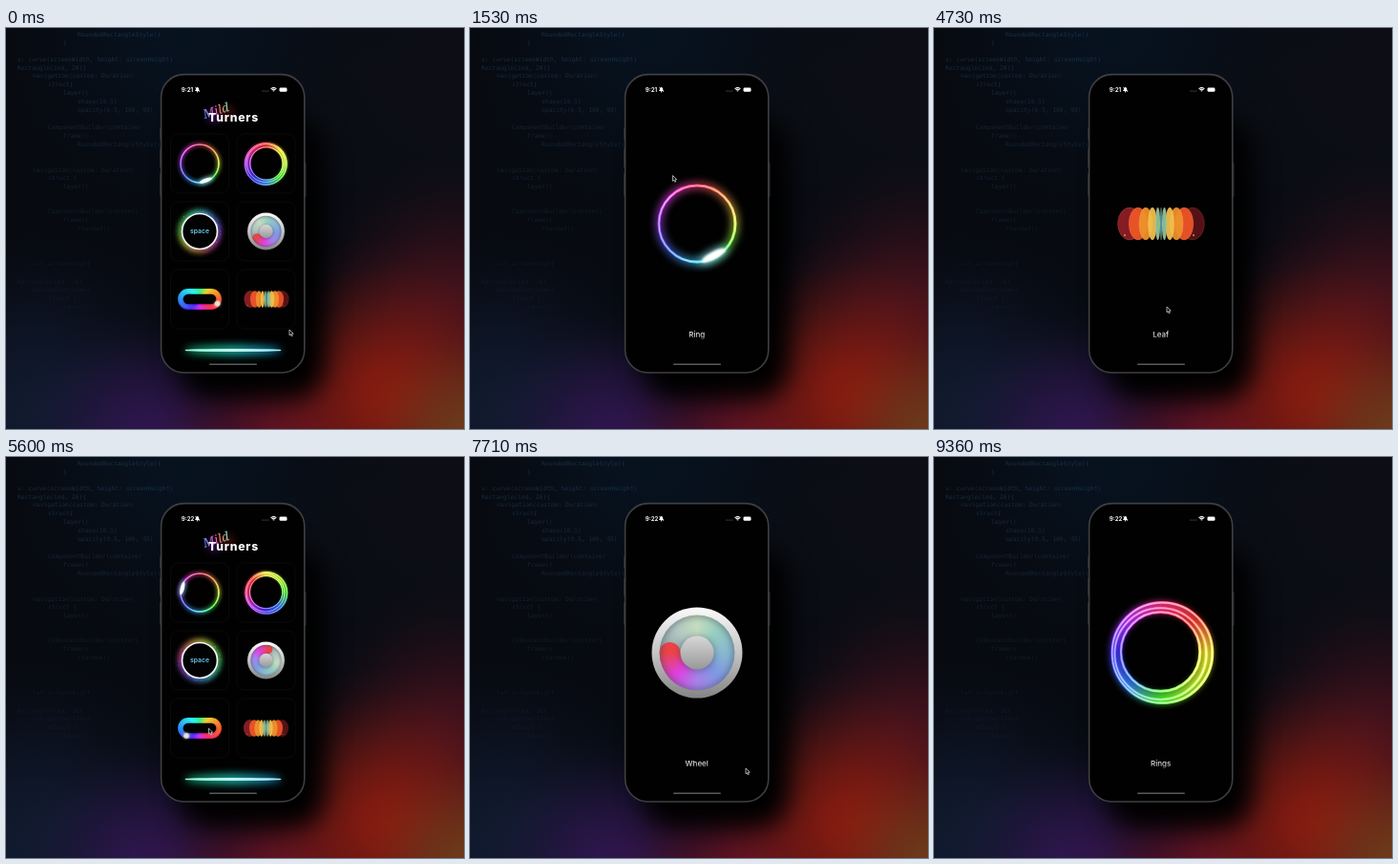
An HTML page with a canvas that plays this animation: 480 by 420 pixels, repeating every 9380 ms.

```html
<!DOCTYPE html>
<html lang="en">
<head>
<meta charset="utf-8">
<title>Loader gallery</title>
<style>
html, body { margin: 0; width: 100%; height: 100%; overflow: hidden; background: #05070c; }
canvas { display: block; width: 480px; height: 420px; }
</style>
</head>
<body>
<canvas id="stage" width="480" height="420"></canvas>
<script>
const W = 480, H = 420, LOOP = 9380, TAU = Math.PI * 2;
const SANS = 'Inter, "Liberation Sans", sans-serif';
const SCREEN = { x: 167.5, y: 52, w: 140.5, h: 306, r: 20 };
const SLIDE = 145;
let ctx = document.getElementById('stage').getContext('2d');
const stage = ctx;

const rad = d => d * Math.PI / 180;
const clamp = v => Math.max(0, Math.min(1, v));
const smooth = v => { v = clamp(v); return v * v * (3 - 2 * v); };
const hsl = (h, s, l, a = 1) => `hsla(${h},${s}%,${l}%,${a})`;

function rng(seed) {
  return () => (seed = (seed * 16807) % 2147483647) / 2147483647;
}
function group(fn) { ctx.save(); fn(); ctx.restore(); }
function ramp(g, stops) {
  stops.forEach((c, i) => g.addColorStop(i / (stops.length - 1), c));
  return g;
}
const vert = (a, b, ...stops) => ramp(ctx.createLinearGradient(0, a, 0, b), stops);
// hues are spread clockwise over the full turn
function sweep(start, hues, s = 95, l = 60) {
  return ramp(ctx.createConicGradient(start, 0, 0), [...hues, hues[0]].map(h => hsl(h, s, l)));
}
function box(x, y, w, h, r) { ctx.beginPath(); ctx.roundRect(x, y, w, h, r); }
function disc(x, y, r, fill) {
  ctx.beginPath(); ctx.arc(x, y, r, 0, TAU);
  ctx.fillStyle = fill; ctx.fill();
}
function circle(x, y, r, stroke, width) {
  ctx.beginPath(); ctx.arc(x, y, r, 0, TAU);
  ctx.strokeStyle = stroke; ctx.lineWidth = width; ctx.stroke();
}
function text(s, x, y, font, fill, align = 'left') {
  ctx.font = font; ctx.fillStyle = fill; ctx.textAlign = align;
  ctx.fillText(s, x, y);
}
const blur = px => { ctx.filter = `blur(${px}px)`; };

// ---- loaders, drawn around 0,0 at full size; k is the scale in use ----

const RING_HUES = [68, 120, 190, 225, 270, 300, 345, 25];
function ring(t, k, big) {
  const hues = sweep(0, RING_HUES, 90, 62);
  const a = rad(big ? 62 + 215 * (t - 1.53) : 70 + 215 * t);
  group(() => { blur(4 * k); ctx.globalAlpha = .8; circle(0, 0, 40, hues, 6); });
  circle(0, 0, 40, hues, 3);
  circle(0, 0, 40, sweep(0, RING_HUES, 100, 84), 1.2);
  ctx.rotate(a);
  const glint = (rx, ry, fill, b) => group(() => {
    blur(b * k);
    ctx.beginPath(); ctx.ellipse(37.5, 0, ry, rx, 0, 0, TAU);
    ctx.fillStyle = fill; ctx.fill();
  });
  glint(17, 6, 'rgba(150,225,255,.7)', 4);
  glint(14, 4, '#fff', 1);
}

const RINGS_HUES = [58, 76, 112, 215, 245, 282, 335, 362];
function rings(t, k) {
  const a = rad(120 * (t - 9.36));
  const hues = sweep(a, RINGS_HUES, 90, 58), pale = sweep(a, RINGS_HUES, 100, 83);
  group(() => { blur(3.5 * k); ctx.globalAlpha = .8; circle(0, 0, 48, hues, 11); });
  group(() => { ctx.globalAlpha = .45; circle(0, 0, 47, hues, 11); });
  [52.5, 48, 41.5].forEach((r, i) => {
    const b = a * 1.5 + i * TAU / 3, x = 1.2 * Math.cos(b), y = 1.2 * Math.sin(b);
    circle(x, y, r, hues, 3.2);
    circle(x, y, r, pale, 1.8);
  });
}

const rand = rng(41);
const dust = Array.from({ length: 70 }, () => [rand() * TAU, rand(), rand()]);
function space(t, k) {
  const hue = 195 + 64.5 * t;
  const hues = sweep(rad(90 * t), RING_HUES.map(h => h + hue), 80, 62);
  group(() => { blur(8 * k); circle(0, 0, 44, hues, 13); });
  dust.forEach(([a, d, s]) => {
    const out = (d + t * .5) % 1, r = 45 + 15 * out;
    disc(r * Math.cos(a + t * .3), r * Math.sin(a + t * .3), .5 + .7 * s,
      hsl(hue + a * 57, 80, 75, .8 * (1 - out)));
  });
  disc(0, 0, 43, '#020203');
  group(() => { blur(.5 * k); circle(0, 0, 43, '#f4f4fa', 4); });
  text('space', 0, 5.5, `600 16px ${SANS}`, hsl(hue, 80, 68), 'center');
}

function wheel(t, k, big) {
  const a = rad(big ? 180 + 153 * (t - 7.71) : 145 + 153 * t);
  disc(0, 0, 47.5, vert(-47, 47, '#fafafa', '#c4c4c4', '#858585'));
  group(() => {
    ctx.beginPath(); ctx.arc(0, 0, 39.5, 0, TAU); ctx.clip();
    disc(0, 0, 40, ramp(ctx.createConicGradient(a, 0, 0), ['#8fa0a4', '#b2c6c2',
      '#c4dcbf', '#95ccc0', '#88b8cf', '#7f99e2', '#a583e8', '#e040df', '#ea4446']));
    // round nose in front of the sweep
    ctx.beginPath();
    ctx.arc(28.5 * Math.cos(a), 28.5 * Math.sin(a), 11, a - .03, a + Math.PI + .03);
    ctx.fillStyle = '#ea4446'; ctx.fill();
    group(() => { blur(3 * k); circle(0, 0, 40, 'rgba(60,70,85,.55)', 5); });
    group(() => { blur(3 * k); disc(0, 1, 19, 'rgba(50,50,70,.35)'); });
  });
  disc(0, 0, 17.5, vert(-17, 17, '#d6d6d6', '#999'));
}

const LANE = { half: 23.5, r: 16 };
const LANE_HUES = [15, 342, 290, 250, 210, 180, 150, 50];
function onLane(s) {
  const { half, r } = LANE, side = half * 2, bend = Math.PI * r, lap = 2 * (side + bend);
  s = ((s % lap) + lap) % lap;
  const flip = s >= lap / 2 ? -1 : 1;
  s %= lap / 2;
  let x = s - half, y = -r;
  if (s > side) {
    const a = (s - side) / r - Math.PI / 2;
    x = half + r * Math.cos(a); y = r * Math.sin(a);
  }
  return [x * flip, y * flip];
}
function track(t, k, big) {
  const lane = (w, c) => {
    box(-39.5, -16, 79, 32, 16);
    ctx.strokeStyle = c; ctx.lineWidth = w; ctx.stroke();
  };
  const s = big ? 66 : 88;
  lane(11, sweep(0, LANE_HUES, s, big ? 44 : 52));
  group(() => { blur(2 * k); lane(4, sweep(0, LANE_HUES, s, big ? 54 : 62)); });
  const [x, y] = onLane(big ? 42.5 + 116 * (t - 6.69) : 82 + 116 * t);
  group(() => { blur(2 * k); disc(x, y, 7, 'rgba(255,220,160,.5)'); });
  disc(x, y, 5.4, '#e9e4de');
  circle(x, y, 4.2, 'rgba(190,170,160,.6)', .8);
}

const LEAVES = ['#3d9db0', '#8fc4a0', '#f2c04c', '#f0912c', '#ee5528', '#8e1d26'];
function leaf(t) {
  const flow = .11 * Math.sin((t - 4.73) * 3.6);
  for (let j = 5; j >= 0; j--) {
    for (const side of j ? [-1, 1] : [1]) {
      const u = side * j / 5 + flow * (1 - j / 6), m = Math.abs(u);
      const x = Math.sign(u) * 33 * m ** 1.4, w = 2 + 23 * m ** 1.25;
      ctx.beginPath(); ctx.ellipse(x, 0, w / 2, 17, 0, 0, TAU);
      ctx.globalAlpha = j == 5 && side > 0 ? .6 : .94;
      ctx.fillStyle = LEAVES[j]; ctx.fill();
      ctx.strokeStyle = 'rgba(255,190,90,.35)'; ctx.lineWidth = .5; ctx.stroke();
    }
  }
  ctx.globalAlpha = .7;
  for (const x of [-38, 34]) disc(x, 12, .9, '#ffd9a0');
}

// ---- fixed scenery ----

const CODE = [
  [8, 75, 'RoundedRectangleStyle()'], [17, 60, '}'],
  [34, 12, 'x: curve(screenWidth, height: screenHeight)'],
  [43, 12, 'Rectangle(ind, 20){'], [51, 28, 'navigation(custom: Duration('],
  [60, 44, 'struct{'], [69, 60, 'layer()'], [78, 75, 'shape(10.5)'],
  [87, 75, 'opacity(0.5, 100, 95)'], [105, 44, 'ComponentBuilder(container'],
  [114, 60, 'frame()'], [123, 75, 'RoundedRectangleStyle()'],
  [150, 28, 'navigation(custom: Duration('], [158, 44, 'struct {'], [167, 60, 'layer()'],
  [193, 44, 'ComponentBuilder(content)'], [202, 60, 'frame()'], [211, 75, 'rounded()'],
  [248, 28, 'let screenHeight'], [267, 12, 'Rectangle(ind, 20)'],
  [275, 28, 'navigation(view)'], [284, 44, 'struct {'], [293, 60, 'layer()']
];

function glow(x, y, r, color) {
  const g = ctx.createRadialGradient(x, y, 0, x, y, r);
  for (let i = 0; i <= 6; i++) g.addColorStop(i / 6, `rgba(${color},${(1 - smooth(i / 6)) * .95})`);
  ctx.fillStyle = g; ctx.fillRect(0, 0, W, H);
}

function scenery() {
  const layer = document.createElement('canvas');
  layer.width = W; layer.height = H;
  ctx = layer.getContext('2d');
  ctx.fillStyle = '#070a11'; ctx.fillRect(0, 0, W, H);
  glow(450, 60, 260, '14,15,22');
  glow(190, 0, 200, '7,19,32');
  glow(30, 400, 190, '17,27,48');
  glow(150, 430, 140, '48,22,80');
  glow(285, 445, 140, '98,18,40');
  glow(470, 300, 170, '66,18,30');
  glow(400, 385, 165, '140,28,16');
  glow(490, 430, 125, '112,62,28');
  CODE.forEach(([y, x, s]) => text(s, x, y + 1, '6.3px "DejaVu Sans Mono", monospace',
    `rgba(50,90,125,${.44 - y / 1000})`));
  group(() => {
    blur(13); ctx.fillStyle = '#000';
    box(180, 96, 154, 292, 34); ctx.fill();
  });
  ctx.fillStyle = '#2c2c2e';
  [[161, 104, 13], [161, 126, 20], [161, 152, 24], [312.5, 141, 36]].forEach(([x, y, h]) => {
    box(x, y, 2, h, 1); ctx.fill();
  });
  box(162.6, 48.6, 150.2, 312.4, 24); ctx.fillStyle = '#010101'; ctx.fill();
  ctx.strokeStyle = '#3f3f42'; ctx.lineWidth = 1.6; ctx.stroke();
  ctx = stage;
  return layer;
}

// ---- screens ----

const CELLS = [
  [203, 142, .5, ring], [272.5, 142, .415, rings],
  [203, 213, .43, space], [272.5, 213, .41, wheel],
  [203, 284, .51, track], [272.5, 284, .515, leaf]
];

function heading() {
  group(() => { blur(5); disc(218, 93, 6, 'rgba(120,30,190,.55)'); disc(233, 88, 5, 'rgba(210,50,40,.5)'); });
  group(() => {
    ctx.translate(208, 95); ctx.rotate(-.3);
    const g = ramp(ctx.createLinearGradient(0, 0, 27, 0), ['#4fb4ff', '#c95cf0', '#ff7a5c', '#7fe0c0']);
    text('Mild', 0, 0, 'italic 13px "Noto Serif", "Liberation Serif", serif', g);
  });
  group(() => {
    ctx.letterSpacing = '.8px';
    text('Turners', 212, 98, `800 12.2px ${SANS}`, '#fff');
  });
}

function lightBar(t) {
  const hue = 175 + 64.5 * t;
  const beam = (h, b, ...c) => group(() => {
    blur(b);
    ctx.beginPath(); ctx.ellipse(238, 337.5, 51, h, 0, 0, TAU);
    ctx.fillStyle = ramp(ctx.createLinearGradient(187, 0, 289, 0), c); ctx.fill();
  });
  beam(5, 4, hsl(hue - 20, 80, 45, .8), hsl(hue, 75, 50, .8), hsl(hue + 25, 80, 50, .8));
  beam(1.6, .5, hsl(hue - 20, 80, 60), hsl(hue, 60, 90), hsl(hue + 25, 80, 65));
  box(188, 336.8, 100, 1.4, .7);
  ctx.fillStyle = hsl(hue, 65, 82); ctx.fill();
}

function gallery(t) {
  heading();
  CELLS.forEach(([x, y, k, draw]) => {
    box(x - 30.5, y - 31, 61, 62, 8);
    ctx.strokeStyle = '#0a0a0b'; ctx.lineWidth = 1; ctx.stroke();
    group(() => { ctx.translate(x, y); ctx.scale(k, k); draw(t, k, false); });
  });
  lightBar(t);
}

function detail(page, t) {
  ctx.fillStyle = '#010101';
  ctx.fillRect(SCREEN.x, SCREEN.y, SCREEN.w, SCREEN.h);
  group(() => { ctx.translate(238, 205); page.draw(t, 1, true); });
  text(page.name, 237.7, 323.8, `500 8px ${SANS}`, vert(316, 327, '#fff', '#ddd', '#555'), 'center');
}

const PAGES = [
  { name: 'Ring', draw: ring, open: 1000, close: 2880 },
  { name: 'Leaf', draw: leaf, open: 3880, close: 4860 },
  { name: 'Track', draw: track, open: 5800, close: 6585 },
  { name: 'Wheel', draw: wheel, open: 7320, close: 7850 },
  { name: 'Rings', draw: rings, open: 8230, close: 1e5 }
];
const PUSH = 360, POP = 300;

function statusBar(ms) {
  text(ms < 5200 ? '9:21' : '9:22', 183.8, 66.8, `700 6px ${SANS}`, '#fff');
  ctx.fillStyle = '#fff';
  ctx.beginPath();
  ctx.moveTo(197.9, 66); ctx.quadraticCurveTo(199, 65, 198.9, 63.5);
  ctx.arc(200.5, 63.5, 1.6, Math.PI, 0);
  ctx.quadraticCurveTo(202, 65, 203.1, 66);
  ctx.fill();
  disc(200.5, 66.8, .7, '#fff');
  ctx.beginPath(); ctx.moveTo(198.2, 62); ctx.lineTo(203, 67);
  ctx.strokeStyle = '#fff'; ctx.lineWidth = .6; ctx.stroke();
  for (let i = 0; i < 4; i++) disc(269 + i * 1.9, 66, .55, '#777');
  [1.2, 2.8, 4.3].forEach(r => {
    ctx.beginPath(); ctx.arc(280.5, 67, r, rad(-132), rad(-48));
    ctx.lineWidth = 1.1; ctx.stroke();
  });
  box(286.5, 62.6, 8, 4.2, 1.4); ctx.fillStyle = '#fff'; ctx.fill();
}

// time, x, y of the pointer tip
const PATH = [
  [0, 297, 316], [250, 297, 316], [850, 204, 144], [1100, 204, 144], [1500, 212.5, 154.5],
  [2300, 212.5, 154.5], [2860, 222, 290], [3180, 298, 294], [3480, 264, 281], [3900, 270, 283],
  [4650, 244, 292], [4850, 244, 292], [5160, 300, 296], [5700, 204, 283], [5850, 204, 283],
  [6400, 256, 303], [6570, 256, 304], [6690, 296, 306], [6850, 304, 306], [7240, 273, 214],
  [7360, 273, 214], [7680, 289, 326], [7730, 289, 326], [7840, 236, 322], [8080, 300, 318],
  [8210, 272, 144], [8400, 272, 146], [8800, 284, 176]
];
function pointer(ms) {
  const i = PATH.findIndex(p => p[0] > ms);
  if (i < 0) return;
  const [t0, x0, y0] = PATH[i - 1], [t1, x1, y1] = PATH[i];
  const e = smooth((ms - t0) / (t1 - t0));
  group(() => {
    ctx.translate(x0 + (x1 - x0) * e, y0 + (y1 - y0) * e);
    ctx.beginPath();
    [[0, 0], [0, 5.8], [1.3, 4.7], [2.2, 6.8], [3.3, 6.3], [2.4, 4.3], [4.2, 4.2]]
      .forEach(p => ctx.lineTo(...p));
    ctx.closePath();
    ctx.fillStyle = '#000'; ctx.fill();
    ctx.strokeStyle = '#d0d0d0'; ctx.lineWidth = .8; ctx.stroke();
  });
}

const backdrop = scenery();

function render(ms) {
  const t = ms / 1000;
  const page = PAGES.find(p => ms >= p.open && ms < p.close + POP);
  let off = 1;
  if (page) {
    off = ms >= page.close ? smooth((ms - page.close) / POP)
      : (1 - clamp((ms - page.open) / PUSH)) ** 3;
  }
  ctx.drawImage(backdrop, 0, 0);
  group(() => {
    box(SCREEN.x, SCREEN.y, SCREEN.w, SCREEN.h, SCREEN.r); ctx.clip();
    const shade = smooth((off - .35) / .55);
    if (shade > 0) {
      group(() => { ctx.translate(-.3 * SLIDE * (1 - off), 0); gallery(t); });
      ctx.fillStyle = `rgba(1,1,1,${1 - shade})`;
      ctx.fillRect(SCREEN.x, SCREEN.y, SCREEN.w, SCREEN.h);
    }
    if (page && off < 1) group(() => {
      ctx.translate(SLIDE * off, 0);
      detail(page, t);
    });
    statusBar(ms);
    box(213, 351.6, 50, 1.5, .75); ctx.fillStyle = '#5a5a5c'; ctx.fill();
  });
  pointer(ms);
}

const start = performance.now();
function tick() {
  render((performance.now() - start) % LOOP);
  requestAnimationFrame(tick);
}
tick();
</script>
</body>
</html>
```
